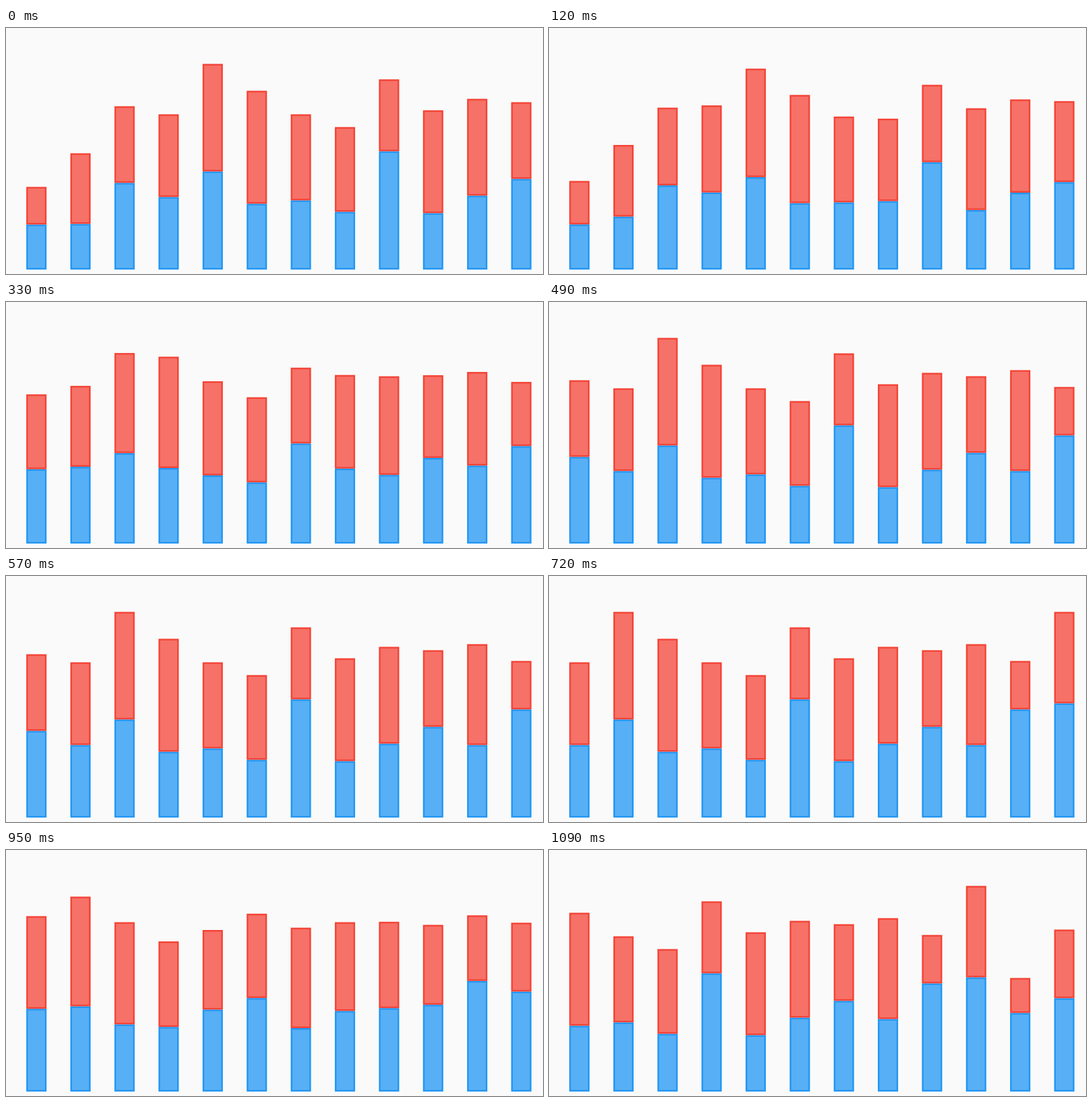
An HTML page with a canvas for the animation above (1.19 s loop, 800 by 366 pixels).

```html
<!DOCTYPE html>
<html lang="en">
<head>
<meta charset="utf-8">
<title>Stacked bars</title>
<style>
html, body { margin: 0; width: 100%; height: 100%; overflow: hidden; background: #fafafa; }
canvas { display: block; width: 800px; height: 366px; }
</style>
</head>
<body>
<canvas id="c" width="800" height="366"></canvas>
<script>
const ctx = document.getElementById("c").getContext("2d");
const LOOP = 1190, TICK = 40, BARS = 12;
const FLOOR = 359.4, LINE = 2.4, WIDTH = 30.2, PITCH = 65.67, LEFT = 30.2;

// two series of heights; the chart is a window of twelve sliding along them
const blue = [67, 68, 129, 108, 146, 98, 103, 86, 176, 84, 110, 135, 108, 161, 170, 117, 139];
const red = [56, 105, 114, 123, 160, 168, 128, 126, 107, 153, 144, 114, 150, 72, 136, 52, 102];

// where the window stands: start time, hold time, offset into the series
const stops = [
  { at: 0, hold: 120, pos: 0 },
  { at: 200, hold: 70, pos: 0.53 },
  { at: 330, hold: 30, pos: 1.7 },
  { at: 490, hold: 180, pos: 2 },
  { at: 720, hold: 70, pos: 3 },
  { at: 950, hold: 50, pos: 3.4 },
  { at: 1090, hold: 100, pos: 5 }
];

const mix = (a, b, p) => a + (b - a) * p;

function sample(row, x) {
  const i = Math.floor(x);
  return mix(row[i], row[Math.min(i + 1, row.length - 1)], x - i);
}

function offsetAt(t) {
  let i = stops.length - 1;
  while (stops[i].at > t) i--;
  const a = stops[i], b = stops[i + 1], end = a.at + a.hold;
  if (!b || t < end) return a.pos;
  // move in even ticks, the last one landing on the next stop
  const gap = b.at - end, n = Math.floor(gap / TICK) + 1;
  const p = (Math.floor((t - end) / gap * (n - 1)) + 1) / n;
  return mix(a.pos, b.pos, p);
}

function bar(i, top, bottom, color) {
  const x = LEFT + i * PITCH + LINE / 2, y = top + LINE / 2;
  const w = WIDTH - LINE, h = bottom - top - LINE;
  ctx.fillStyle = ctx.strokeStyle = color;
  ctx.globalAlpha = 0.75;
  ctx.fillRect(x, y, w, h);
  ctx.globalAlpha = 1;
  ctx.strokeRect(x, y, w, h);
}

function draw(t) {
  const pos = offsetAt(t % LOOP);
  ctx.fillStyle = "#fafafa";
  ctx.fillRect(0, 0, 800, 366);
  ctx.lineWidth = LINE;
  for (let i = 0; i < BARS; i++) {
    const mid = FLOOR - sample(blue, pos + i);
    bar(i, mid, FLOOR, "#2196f3");
    bar(i, mid - sample(red, pos + i), mid, "#f44336");
  }
}

const start = performance.now();
function tick() {
  draw(performance.now() - start);
  requestAnimationFrame(tick);
}
tick();
</script>
</body>
</html>
```
